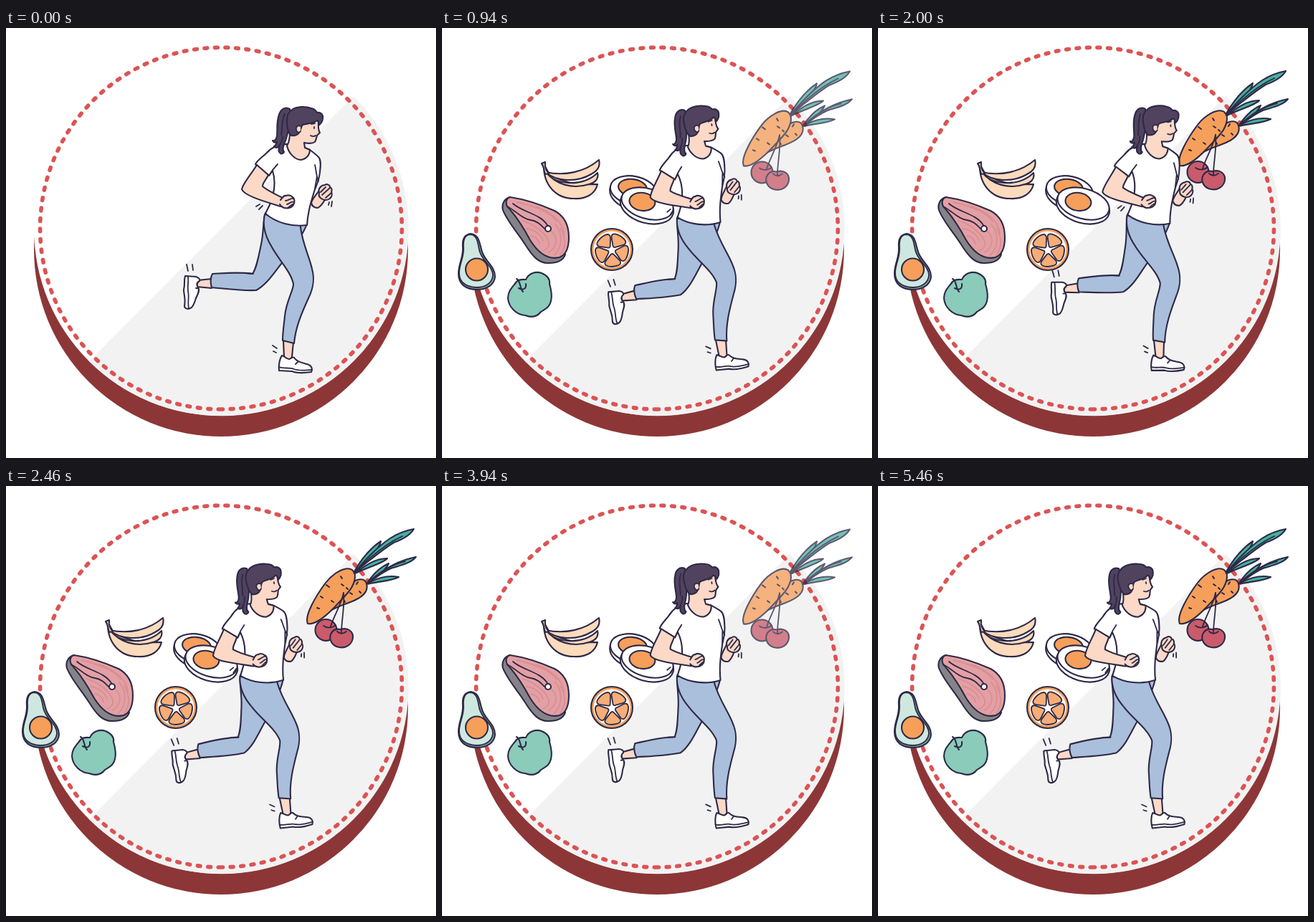
These frames come from a looping animation (600x600 px, 6 s). An HTML page:

```html
<!DOCTYPE html>
<html lang="en">
<head>
<meta charset="utf-8">
<title>Healthy running</title>
<style>
html, body { margin: 0; width: 100%; height: 100%; overflow: hidden; background: #fff }
svg { display: block; width: 100vw; height: 100vh }
.ink { stroke: #2d2946; stroke-width: 2.1; stroke-linecap: round; stroke-linejoin: round; fill: none }
.ink .thin { stroke-width: 1.8 }
.white { fill: #fff } .skin { fill: #fcd8c7 } .hair { fill: #51435f } .jeans { fill: #aabfdc }
.orange { fill: #f69f5b } .leaf { fill: #45b0a0 } .cherry { fill: #ca5b6b } .banana { fill: #fcdabc }
.mint { fill: #cee8e0 } .rind { fill: #7d9c9b } .apple { fill: #8acbba } .fish { fill: #e3a0a4 } .scale { fill: #858387 }
.none { stroke: none }
</style>
</head>
<body>
<svg viewBox="0 0 600 600">
  <circle cx="300" cy="309" r="261" fill="#8d3637"/>
  <circle cx="300" cy="280" r="261" fill="#fff"/>
  <path d="M485 95A261 261 0 0 1 116 465Z" fill="#f2f2f2"/>
  <path d="M300 532A252.4 252.4 0 0 1 300 27.2A252.4 252.4 0 0 1 300 532" fill="none" stroke="#dc5354"
    stroke-width="5.600" stroke-linecap="round" stroke-dasharray="3.8 10.72"/>

  <g class="ink">
    <g class="food" data-start="100">
      <path class="rind" d="M40 287C51 288 52 298 55 309C58 325 74 331 74 347C73 360 60 365 49 365C34 365 23 358 23 343C23 328 30 321 29 306C28 294 32 288 40 287Z"/>
      <path class="mint thin" d="M40 288C49 289 50 299 52 310C56 326 71 332 71 345C70 357 59 362 48 362C34 361 24 355 24 342C24 328 31 321 30 306C29 294 33 288 40 288Z"/>
      <circle class="orange" cx="48.500" cy="337" r="15.500"/>
    </g>

    <g class="food" data-start="170">
      <path class="scale" d="M95 236C86 238 83 247 85 254C91 270 106 286 116 302C126 318 135 329 149 328C159 328 169 325 172 316L110 250Z"/>
      <path class="fish" d="M95 236C116 239 139 247 157 255C172 263 177 278 177 292C177 308 172 317 164 320C147 324 133 312 123 296C115 281 104 263 91 249C88 243 90 237 95 236Z"/>
      <g stroke="#d98e94" stroke-width="1.800">
        <path d="M105 243C126 248 152 257 160 270M131 249C153 257 169 271 170 287M158 274C170 288 167 307 157 317M152 283C163 292 160 306 149 313M112 269C124 272 141 283 147 294C152 303 148 308 141 311M118 280C129 281 139 289 141 297M124 290C131 291 135 296 136 301M165 279C174 294 172 307 165 317"/>
      </g>
      <path class="thin" d="M91 249C102 254 112 267 124 268C131 269 137 273 143 280M99 245C112 257 137 259 147 275"/>
      <circle class="white" cx="148" cy="280" r="4"/>
    </g>

    <g class="food" data-start="210">
      <path class="apple" d="M117 351C121 342 131 339 139 342C148 346 151 351 150 357C152 364 154 374 152 381C150 390 144 392 138 396C132 404 124 404 116 401C104 400 93 390 92 377C92 367 98 362 104 354C108 350 113 351 117 351Z"/>
      <path d="M104 350C110 353 108 362 113 368M117 357C118 363 114 367 107 363"/>
    </g>

    <g class="food" data-start="270">
      <path class="banana" d="M142 190C141 218 158 238 184 238C202 239 214 231 217 218C203 218 180 222 150 204Z"/>
      <path class="banana" d="M146 202C158 220 198 222 217 202C219 210 214 216 205 218C181 226 158 217 146 202Z"/>
      <path class="banana" d="M144 201C172 207 199 201 219 184C221 192 218 199 208 204C188 216 159 214 146 202Z"/>
      <path class="banana" d="M139 189L144 187C143 195 146 200 149 203L144 204C142 199 143 194 139 189Z"/>
    </g>

    <g class="food" data-start="340">
      <circle class="orange" cx="237" cy="309" r="29"/>
      <circle class="white none" cx="237" cy="309" r="25.500"/>
      <g id="slices" transform="translate(237 310)" fill="#f8ad76"></g>
    </g>

    <g class="food" data-start="400">
      <g transform="rotate(12 267 229)">
        <ellipse class="white" cx="267" cy="230" rx="33" ry="23"/>
        <ellipse class="white" cx="267" cy="227" rx="33" ry="20"/>
      </g>
      <ellipse class="orange" cx="266" cy="223" rx="20" ry="12" transform="rotate(8 266 223)"/>
      <g transform="rotate(16 286 247)">
        <ellipse class="white" cx="286.500" cy="249" rx="38" ry="23"/>
        <ellipse class="white" cx="286" cy="245" rx="37" ry="21"/>
      </g>
      <ellipse class="orange" cx="279.500" cy="242.500" rx="18" ry="12.500" transform="rotate(8 280 242)"/>
    </g>

    <g class="food" data-start="560">
      <g class="leaf">
        <path d="M503 137C512 123 522 113 534 108C530 118 516 128 503 137Z"/>
        <path d="M503 137C516 129 532 124 548 127C538 133 519 133 503 137Z"/>
        <path d="M503 137C523 118 546 104 572 99C565 108 549 111 537 115C524 121 512 130 503 137Z"/>
      </g>
      <path class="orange" d="M427 189C445 171 460 155 477 140C487 129 500 127 503 136C507 149 495 157 478 163C460 169 440 180 427 189Z"/>
      <path d="M491 134L489 137M483 151L480 149M495 149L493 147M473 162L472 160"/>
      <g class="leaf">
        <path d="M485 121C494 105 506 88 523 77C521 89 506 103 485 121Z"/>
        <path d="M487 122C501 111 515 101 532 101C526 108 508 112 487 122Z"/>
        <path d="M486 121C502 102 518 85 536 73C547 66 558 62 569 60C564 69 552 75 541 79C523 90 502 108 486 121Z"/>
      </g>
      <path class="thin" d="M488 119C508 99 529 81 553 70M506 134C521 121 540 109 557 105"/>
      <path class="orange" d="M421 192C416 181 432 154 446 135C456 122 474 111 483 117C491 124 486 139 476 150C460 168 436 195 421 192Z"/>
      <path d="M447 138L451 141M467 126L469 129M439 154L442 156M471 139L468 137M477 144L475 142M457 162L454 160M434 170L437 171"/>
      <circle class="cherry" cx="446.500" cy="201" r="15"/>
      <path class="thin" d="M443 195C448 199 456 198 460 194M453 196C458 180 468 165 471 149"/>
      <path class="cherry" d="M467 200C477 197 485 203 484 212C483 221 474 227 465 225C456 224 450 215 453 207C456 200 462 199 467 200Z"/>
      <path class="thin" d="M462 203C466 207 471 206 475 203M468 205C468 187 473 168 471 149"/>
    </g>

    <g id="runner">
      <path class="skin" d="M287 350L268 352L266 361L287 363Z"/>
      <path class="white" d="M250 346L265 347C269 348 271 351 270 353C265 356 266 359 268 362C271 367 267 372 265 377C263 384 261 390 257 391C253 393 249 391 249 388C251 377 248 372 248 365C250 358 248 352 250 346Z"/>
      <path class="thin" d="M254 347C255 355 253 360 254 367C256 376 253 383 255 391M265 363L268 363"/>
      <path class="jeans" d="M362 258C358 271 360 283 356 302C352 320 350 334 344 343C325 340 306 342 288 343C285 348 285 356 287 362C307 364 330 367 349 366C366 357 377 336 390 322C399 308 414 291 420 273Z"/>
      <path class="thin" d="M335 342L345 343"/>
      <path class="skin" d="M387 436L388 459L396 464L399 459L401 438Z"/>
      <path class="white" d="M385 457C389 458 391 462 395 462C398 461 400 458 402 460C406 466 413 467 420 469C427 471 428 476 426 480C413 482 404 481 399 479L381 478C380 470 382 461 385 457Z"/>
      <path class="thin" d="M381 473C388 476 396 473 402 476C410 479 419 477 427 477M407 466L404 469"/>
      <path class="jeans" d="M361 260C358 273 361 289 370 304C380 323 397 339 401 357C401 367 391 381 389 402C388 413 386 424 386 436L402 440C404 417 413 397 422 377C429 363 431 351 427 336C423 318 414 302 411 278L411 270Z"/>

      <path class="skin" d="M436 228C432 234 427 239 426 244C427 249 431 251 435 251C440 249 443 243 446 238Z"/>
      <path class="skin" d="M437 230C435 224 440 219 445 219C448 217 452 219 452 222C455 223 455 227 454 229C456 232 454 236 452 238C448 241 443 240 440 238C437 236 436 233 437 230Z"/>
      <path class="thin" d="M439 229L446 222M441 233L452 223M446 237L454 230"/>

      <path class="white" d="M391 162C379 162 370 167 363 175C358 180 351 184 348 190L367 206L372 199C376 212 375 224 372 235C370 245 365 252 362 259C377 272 400 278 420 275C421 257 426 241 431 225C434 218 437 212 438 201C439 193 440 184 436 180C432 176 428 173 424 170C416 166 400 163 391 162Z"/>
      <path class="thin" d="M367 206C371 199 375 194 379 190M431 191C433 199 433 207 436 214M434 207L431 224"/>

      <path class="skin" d="M350 191C343 203 331 216 329 225C332 234 361 242 383 249L386 237C376 232 365 227 358 221C358 216 363 212 366 205Z"/>
      <path class="skin none" d="M381 238L390 239L388 249L380 247Z"/>
      <path class="skin" d="M383 240C386 236 388 233 391 234C395 232 399 235 401 237C404 241 402 244 401 247C398 251 393 252 388 251C385 250 383 248 382 246"/>
      <path class="thin" d="M390 241C394 241 397 237 401 238M392 246C397 245 398 241 402 243M394 250C397 249 398 246 401 246"/>

      <path class="skin" d="M396 145C396 155 395 160 392 164C394 174 402 183 411 184C419 183 424 177 424 170L417 167L416 160C421 161 427 162 431 159C433 156 433 153 434 150L438 146C435 142 436 137 436 130L420 124Z"/>
      <path class="hair" d="M396 113C389 109 383 114 381 121C377 131 379 143 378 151C377 156 374 158 372 157C374 161 376 160 378 159C377 163 375 165 374 165C377 169 381 166 382 163C380 168 380 173 383 175C385 176 387 175 388 173C384 169 388 162 390 157C393 150 393 142 398 131Z"/>
      <path class="hair" d="M399 114C406 109 418 109 426 112C431 113 433 116 434 118C439 117 443 121 442 126C442 131 438 135 436 136C437 132 436 130 434 129C428 134 419 133 414 135C411 138 412 142 409 146C407 149 404 151 398 150C394 147 392 138 392 128C392 121 395 117 399 114Z"/>
      <path class="thin" d="M389 120C384 130 386 139 384 149M386 151C386 156 384 160 382 163"/>
      <path class="skin thin" d="M411 137C407 135 404 138 405 142C406 146 409 147 411 144"/>
      <path class="thin" d="M426 134L431 133M430 138L430 140M425 150C428 152 431 151 432 150"/>
      <path class="thin" d="M349 249L354 246M353 253L358 248M450 247L451 243M454 249L455 242M252 330L254 339M260 330L261 338M372 443L378 447M373 451L377 453"/>
    </g>
  </g>
</svg>
<script>
const LOOP = 3000, SWING = 820, FADE = 500, RISE = 32;
const runner = document.getElementById('runner');
const foods = [...document.querySelectorAll('.food')];

document.getElementById('slices').innerHTML = [32, 104, 176, 248, 320].map(a =>
  `<path class="thin" transform="rotate(${a})" d="M2-6L10-15Q13-20 7-22Q0-24-7-22Q-13-20-10-15L-2-6Q0-4 2-6Z"/>`).join('');

const easeOut = x => 1 - (1 - x) ** 3;
const easeInOut = x => x < .5 ? 2 * x * x : 1 - 2 * (1 - x) ** 2;

function draw() {
  const t = performance.now() % LOOP;

  // lean back, forward, back, then rest
  const k = Math.min(t / SWING, 2.99999), turn = Math.floor(k), e = easeInOut(k - turn);
  const lean = turn % 2 ? 1 - e : e;
  runner.setAttribute('transform', `rotate(${-9.7 * lean} 379 467)`);

  for (const f of foods) {
    const x = Math.max(0, Math.min(1, (t - f.dataset.start) / FADE));
    f.setAttribute('opacity', x);
    f.setAttribute('transform', `translate(0 ${RISE * (1 - easeOut(x))})`);
  }
  requestAnimationFrame(draw);
}
draw();
</script>
</body>
</html>
```
